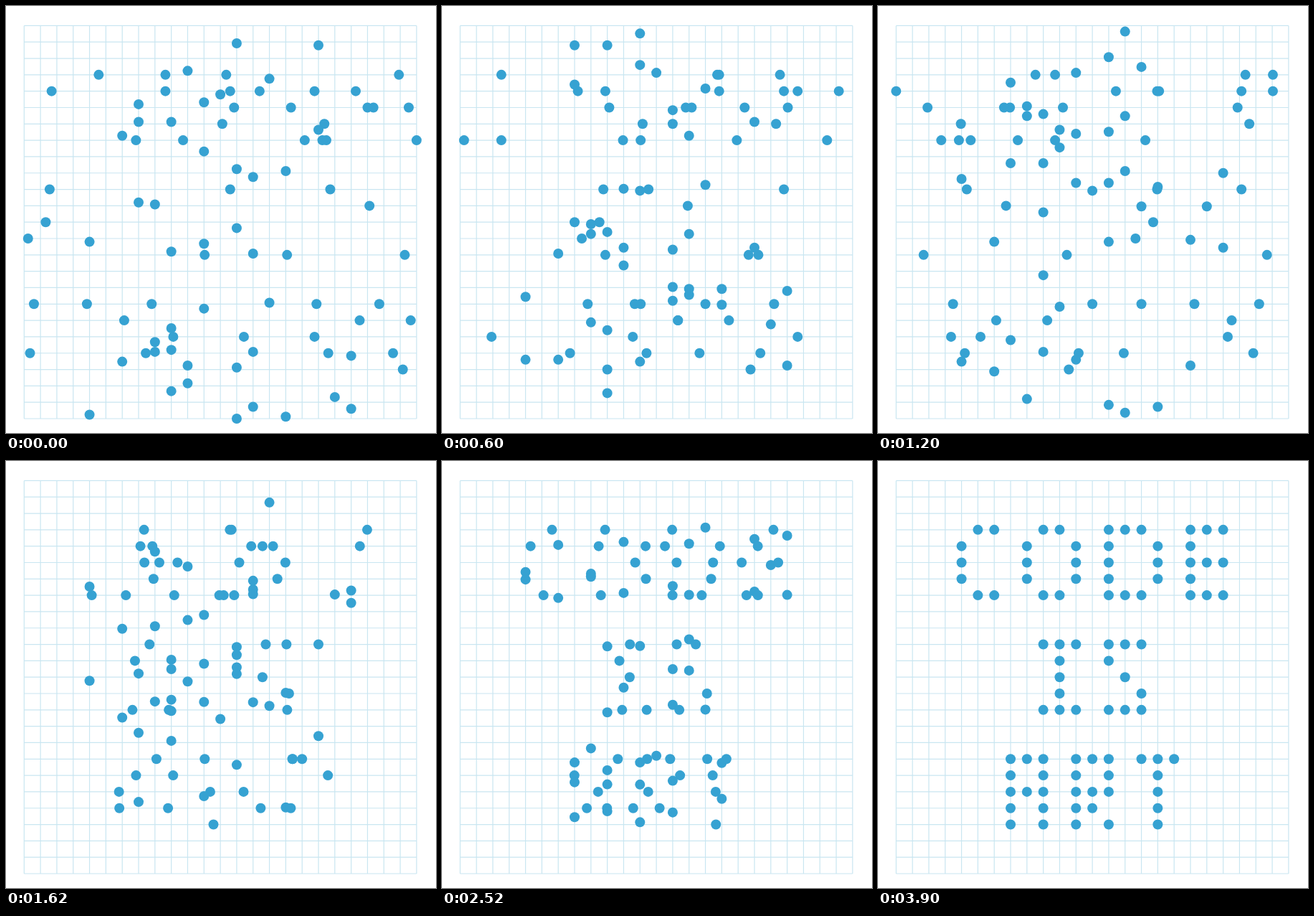
An HTML page with a canvas that plays this animation: 600 px wide and 595 px high, repeating every 4.14 s.

```html
<!DOCTYPE html>
<html lang="en">
<head>
<meta charset="utf-8">
<title>Code is art</title>
<style>
  html, body { margin: 0; width: 100%; height: 100%; overflow: hidden; background: #fff; }
  canvas { display: block; }
</style>
</head>
<body>
<canvas id="stage" width="600" height="595"></canvas>
<script>
const ctx = document.getElementById('stage').getContext('2d');

const LEFT = 25.3, TOP = 27.4, SIZE = 547.6;
const CELLS = 24, STEPS = 200;          // grid cells and travel steps per side
const CELL = SIZE / CELLS, STEP = SIZE / STEPS;
const FIRST_COL = 4, RADIUS = 7;
const LOOP = 4140, TICK = 60, STEP_MS = 10;
const RELEASE = 1410, REST = 3660, SNAP = 3900, DECAY = 0.0028;

// Grid row, dots ("-" slides along its row, "|" along its column),
// and each dot's first step; a negative sign means it starts backwards.
const rows = [
  [3,  '.-|..-|..-||..|-|', [103, 56, -191, 23, -38, 77, -141, -10, 72, 168]],
  [4,  '-...-..-.-..-.-..', [169, 14, 105, -120, 148, 72]],
  [5,  '|...|..-.-..-.-|-', [110, 91, -178, 107, -175, -136, 189, 196]],
  [6,  '|...|..-.|..-.|..', [-198, -166, 101, -9, -153, 53]],
  [7,  '.-|..-|..-|-..--|', [200, 171, -143, -173, 154, -194, -57, -81, -152, -195]],
  [10, '.....|-|.-|-.....', [154, 105, -39, 13, -166, -156]],
  [11, '......-..|.......', [-176, 73]],
  [12, '......-...|......', [11, -116]],
  [13, '......|....-.....', [-182, 2]],
  [14, '.....|--.|-|.....', [115, 194, 92, -200, -134, -27]],
  [17, '...||-.-|-.-|-...', [40, -161, 65, 32, -35, 181, 5, 74, -149]],
  [18, '...-.|.|.-..-....', [-197, -49, -144, 51, -171]],
  [19, '...|-|.|-|..-....', [-90, 112, 186, -64, -148, -174, -76]],
  [20, '...-.-.--...|....', [62, 188, -155, -3, 199]],
  [21, '...|.|.|.|..-....', [-49, -165, 111, -103, 193]]
];

const dots = rows.flatMap(([row, marks, starts]) => {
  let next = 0;
  return [...marks].flatMap((mark, i) => mark === '.' ? [] : [{
    col: FIRST_COL + i,
    row,
    across: mark === '-',
    start: starts[next++]
  }]);
});

// Bounce between 0 and STEPS, resting one step at each wall.
function bounce(s) {
  const span = STEPS + 1, period = span * 2;
  const m = ((s + 0.5) % period + period) % period;
  const p = (m > span ? period - m : m) - 0.5;
  return Math.min(STEPS, Math.max(0, p));
}

function offset(dot, t) {
  if (t >= SNAP) return 0;
  const home = (dot.across ? dot.col : dot.row) * CELL;
  const travel = Math.sign(dot.start) * Math.min(t, RELEASE) / STEP_MS;
  const free = bounce(Math.abs(dot.start) + travel) * STEP - home;
  const settle = Math.max(0, Math.min(t, REST) - RELEASE);
  return free * Math.exp(-DECAY * settle);
}

function drawGrid() {
  ctx.strokeStyle = '#c9e6f1';
  ctx.lineWidth = 1.2;
  ctx.beginPath();
  for (let i = 0; i <= CELLS; i++) {
    const x = LEFT + i * CELL, y = TOP + i * CELL;
    ctx.moveTo(x, TOP);
    ctx.lineTo(x, TOP + SIZE);
    ctx.moveTo(LEFT, y);
    ctx.lineTo(LEFT + SIZE, y);
  }
  ctx.stroke();
}

function drawDot(dot, t) {
  const d = offset(dot, t);
  const x = LEFT + dot.col * CELL + (dot.across ? d : 0);
  const y = TOP + dot.row * CELL + (dot.across ? 0 : d);
  ctx.beginPath();
  ctx.arc(x, y, RADIUS, 0, Math.PI * 2);
  ctx.fill();
}

function draw(t) {
  ctx.fillStyle = '#fff';
  ctx.fillRect(0, 0, 600, 595);
  drawGrid();
  ctx.fillStyle = '#36a2d2';
  dots.forEach(dot => drawDot(dot, t));
}

let begin;
function frame(now) {
  if (begin === undefined) begin = now;
  const t = Math.max(0, now - begin) % LOOP;
  draw(Math.floor(t / TICK) * TICK);
  requestAnimationFrame(frame);
}
draw(0);
requestAnimationFrame(frame);
</script>
</body>
</html>
```
